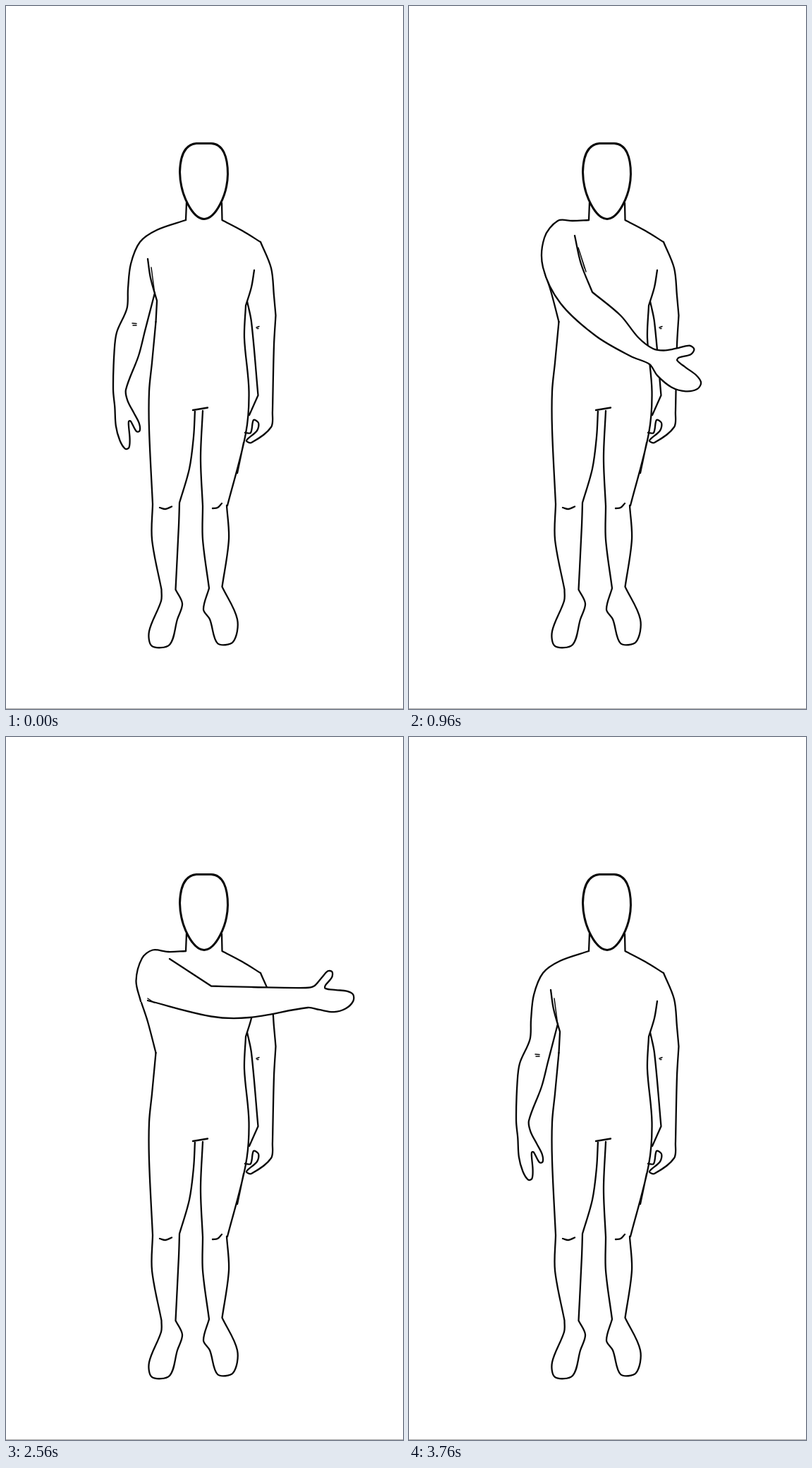
An HTML page for the animation above (4.24 s loop, 563 px wide and 995 px high).

```html
<!DOCTYPE html>
<html lang="en">
<head>
<meta charset="utf-8">
<title>Arm raise</title>
<style>
  html, body { margin: 0; width: 100%; height: 100%; overflow: hidden; background: #fff; }
  svg { display: block; width: 100%; height: 100%; }
  path { fill: none; stroke: #080808; stroke-width: 2.3; stroke-linecap: round; stroke-linejoin: round; }
  #head { stroke-width: 3; }
  #armFill { fill: #fff; stroke: none; }
  #creases, #marks { stroke-width: 1.5; }
</style>
</head>
<body>
<svg viewBox="0 0 563 995">
  <rect y="994" width="563" height="1" fill="#aaa"/>
  <path id="body"/>
  <path id="marks" d="M355,455L359,453.5M356,456.5H358"/>
  <path id="side"/><path id="armFill"/><path id="arm"/><path id="creases"/>
  <path id="head" d="M270,194.5H291C308,195 314.5,214 314.5,238C314,268 297,301 281,301.5C265,301 247,268 246.5,235C247,212 254,196 270,194.5Z"/>
</svg>
<script>
const points = text => text.trim().split(/\s+/).map(p => p.split(',').map(Number));
const strokes = text => text.split('/').map(points);

// Key points of the still parts; "/" lifts the pen and leaves a corner.
const figure = {
  neck: '256,278 255,303 / 306,279 306.5,303 / 306.5,303 335,318 361,334',
  straightArm: '361,334 376,371 380,410 382.5,438 / 382.5,438 380,480 378,573 / 378,573 376,596 348,618 341,615 356,601 358,590 351,586 347,604 339,604',
  innerArm: '352,374 348,398 340,424 / 342,418 348,447 357.5,551 / 357.5,551 345,579',
  hip: '340,424 338,470 344.5,545 340,605 314,707 / 337,618 328,661',
  crotch: '265,572 286,568.5',
  nearLeg: '268,572 266,610 260,655 246,703 / 246,703 245,735 240.5,826',
  nearFoot: '240.5,826 250,846 243,868 232,904 207,906 203,885 220,842 220.5,826',
  nearSide: '220.5,826 207,755 208,705 / 208,705 203,600 203,545 207,505 212.5,447',
  farLeg: '279,573 276,640 279,708 / 279,708 279,755 288,824 / 313,707 316,755 306.5,822',
  farFoot: '288,824 280,854 289,868 300,902 322,900 328,868 306.5,822',
  knees: '218,710 226,712 235,708.5 / 293,711 300,710 306,704'
};

// Open hand from wrist to fingertips, then back along the thumb, in hand lengths
const handShape = points('.28,.22 .6,.25 .85,.17 1,.02 .99,-.11 .85,-.17 .62,-.18 .42,-.2 .42,-.26 .56,-.42 .56,-.53 .46,-.54 .32,-.4 .15,-.23');

const limb = (outer, hand, inner, chest, extra) =>
  ({ outer: points(outer), hand, inner: points(inner), chest: points(chest), ...extra });

// hand: angle in degrees, length, width, reach of the thumb
const hanging = limb(
  '255,303 214,317 190,334 177,365 173,400 171.5,428 157,462 153.5,490 152,543',
  [84, 84, .5, 1.3], '170,543 188,495 197,460 211,406', '214,417 205,385 201,358',
  { side: '212.5,447 214,418', creases: '206,370 211,408 / 179,449 185,449.5 / 180,452 185,452' });

const acrossHip = limb(
  '255,303 222,314 190,327 177,370 184,408 211,460 232,493 256,523 280,547',
  [55, 64, .95, .85], '303,535 280,505 262,470 239,441', '239,441 236,406 226,342',
  { creases: '229,360 230,378 / 234,443 236,446' });

const side = '192,376 201,403 212.5,447';
const acrossWaist = limb(
  '255,303 232,304 211,304 192,328 190,370 215,421 265,467 315,496 341,507',
  [34, 80, 1, 1], '346,485 325,469 300,438 260,405', '260,405 244,365 235,325',
  { side, creases: '240,342 251,376 / 242,348 249,371' });

const raised = (outer, hand, inner, chest, creases) => limb(outer, hand, inner, chest,
  { side, creases, shoulder: points('255,303 230,304 208,301.5 193,313 184.5,345 191,374') });

const poses = [
  hanging, swing(.25), swing(.52), acrossHip, acrossWaist,
  raised('194,374 222,394 282,418 345,430 393,431', [12, 77, .95, 1],
    '400,406 345,392.5 280,373', '280,373 235,324', '240,324 242,333 / 196,374 209,385'),
  raised('201,373 291,395.5 345,397 428,383', [3, 66, 1.1, .92],
    '425,355 350,354 291,352.5', '291,352.5 232,314', '201,370 210,376'),
  raised('203,372 245,382 306,385.5 360,376 417,353', [-9, 79, .9, 1],
    '415,325 380,337 290,341.5', '290,341.5 262,328 237,315', '204,371 212,376')
];

function mix(a, b, t) {
  return Array.isArray(a) ? a.map((v, i) => mix(v, b[i], t)) : a + (b - a) * t;
}

// Swing below the straight line between two poses, most at the hand.
function swing(t) {
  const sag = .18 * t * (1 - t);
  const part = key => mix(hanging[key], acrossHip[key], t).map(([x, y]) => [x, y + sag * (y - 303)]);
  return {
    outer: part('outer'), inner: part('inner'), chest: part('chest'),
    hand: mix(hanging.hand, acrossHip.hand, t)
  };
}

function handPoints([degrees, length, width, reach], wristA, wristB) {
  const [x, y] = mix(wristA, wristB, .5);
  const angle = degrees * Math.PI / 180, cos = Math.cos(angle), sin = Math.sin(angle);
  return handShape.map(([u, v]) => {
    const along = length * u * (v < -.19 ? reach : 1), across = length * width * v;
    return [x + along * cos - across * sin, y + along * sin + across * cos];
  });
}

// Smooth curve whose tangents follow the chord lengths
function curve(pts, command) {
  const gap = (a, b) => Math.hypot(b[0] - a[0], b[1] - a[1]);
  const tangent = i => {
    const a = pts[i - 1] || pts[i], b = pts[i + 1] || pts[i];
    const span = gap(a, pts[i]) + gap(pts[i], b);
    return [(b[0] - a[0]) / span, (b[1] - a[1]) / span];
  };
  return pts.slice(1).reduce((d, q, i) => {
    const p = pts[i], reach = gap(p, q) / 3, start = tangent(i), end = tangent(i + 1);
    const c1 = p.map((v, k) => v + start[k] * reach);
    const c2 = q.map((v, k) => v - end[k] * reach);
    return `${d}C${c1} ${c2} ${q}`;
  }, command + pts[0]);
}

function draw(id, lines, joined) {
  const d = lines.map((line, i) => curve(line, joined && i ? 'L' : 'M')).join('');
  document.getElementById(id).setAttribute('d', d);
}

function drawPose({ shoulder, outer, hand, inner, chest, side, creases }) {
  const outline = [...outer, ...handPoints(hand, outer.at(-1), inner[0]), ...inner];
  const lines = [...(shoulder ? [shoulder] : []), outline, chest];
  draw('armFill', lines, true);
  draw('arm', lines);
  draw('side', side ? strokes(side) : []);
  draw('creases', creases ? strokes(creases) : []);
}

const LOOP = 4240, LOWERING = 2560;
const poseStarts = [0, 480, 560, 720, 960, 1280, 1440, 1760];

// The way down replays the way up in reverse.
function poseAt(time) {
  const phase = time < LOWERING ? time : Math.max(0, LOOP - time - .01);
  return poseStarts.filter(start => start <= phase).length - 1;
}

let shown = -1;
function tick() {
  const index = poseAt(performance.now() % LOOP);
  if (index !== shown) drawPose(poses[shown = index]);
  requestAnimationFrame(tick);
}

draw('body', Object.values(figure).flatMap(strokes));
tick();
</script>
</body>
</html>
```
